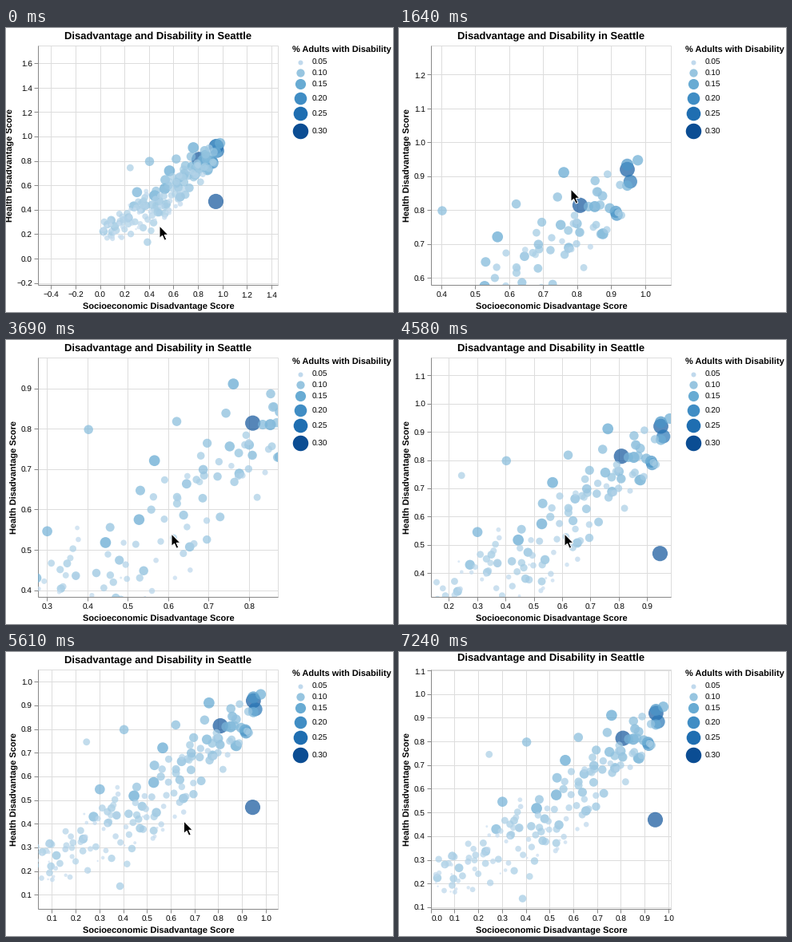
A matplotlib script that plays this animation: 484x356 px, repeating every 7.54 s.

```python
import math

import numpy as np
import matplotlib.pyplot as plt
from matplotlib.animation import FuncAnimation
from matplotlib.collections import LineCollection
from matplotlib.colors import LinearSegmentedColormap
from matplotlib.patches import Polygon, Rectangle

W, H, DPI = 484, 356, 72          # at 72 dpi one point is one pixel
LOOP, INTERVAL = 7540, 29
FRAMES = LOOP // INTERVAL
BEATS = 51                        # the picture only changes on a beat
LEFT, TOP, SIZE = 40, 22, 300
RIGHT, BOTTOM = LEFT + SIZE, TOP + SIZE
FLUSH = 1.5                       # x labels this close to an end align inwards

plt.rcParams["font.family"] = "Liberation Sans"
plt.rcParams["text.hinting"] = "none"
BLUES = LinearSegmentedColormap.from_list("blues", [
    "#cfe1f2", "#bed8ec", "#a8cee5", "#8fc1de", "#74b2d7", "#5ba3cf",
    "#4592c6", "#3181bd", "#206fb2", "#125ca4", "#0a4a90"])

# the few points that stand out: x, y, share of adults with a disability
LANDMARKS = [
    (.808, .815, .29), (.944, .471, .29), (.947, .921, .28),
    (.956, .885, .24), (.947, .935, .19), (.913, .796, .19),
    (.916, .787, .19), (.978, .948, .15), (.760, .912, .16),
    (.565, .722, .16), (.444, .519, .16), (.300, .547, .14),
    (.620, .819, .12), (.402, .799, .12), (.244, .747, .08),
    (.385, .138, .09),
]

# view at the start, then gestures: kind, first beat, last beat, goal
# (cursor position, or pixels per unit for a zoom around the cursor)
START = 153, (118, 289.5), (192, 248)
GESTURES = [
    ("drag", 0, 6, (169.5, 292.5)),
    ("move", 7, 8, (215, 202)),
    ("zoom", 8, 12, 597),
    ("zoom", 12, 13, 506),
    ("move", 13, 14, (313, 231.5)),
    ("drag", 14, 17, (201, 213)),
    ("drag", 17, 23, (393, 109.5)),
    ("move", 23, 25, (207, 243)),
    ("zoom", 28, 32.5, 296.8),
    ("move", 34, 36, (221, 281)),
    ("drag", 36, 38, (222.5, 212)),
    ("drag", 38, 44, (234.5, 227.6)),
    ("move", 46, 49, (430, 390)),
]


def radius(share):
    return np.sqrt(np.maximum(9 + 345 * (np.asarray(share) - 0.05), 1.5))


def shade(share):
    return BLUES((np.asarray(share) - 0.025) / 0.28)


def make_data(count=165):
    """A curved, correlated cloud; the share rises with the health score."""
    rng = np.random.default_rng(7)
    x = np.linspace(.02, .93, count) + rng.normal(0, .02, count)
    spread = .05 + .08 * np.sin(np.pi * x) ** 2
    y = .22 + .34 * x + .36 * x ** 2 + spread * rng.triangular(-2, 0, 2, count)
    share = np.clip(.03 + .11 * y + rng.normal(0, .025, count), .025, .165)
    order = np.argsort(-share)
    cloud = np.array([x, y, share])[:, order]
    return np.hstack([np.array(LANDMARKS).T, cloud])


def state(beat):
    scale, origin, tip = START
    origin, tip = np.array(origin, float), np.array(tip, float)
    for kind, begin, end, goal in GESTURES:
        u = min(max((beat - begin) / (end - begin), 0), 1)
        if kind == "zoom":
            factor = (goal / scale) ** u
            origin = tip + (origin - tip) * factor
            scale *= factor
        else:
            shift = (np.array(goal) - tip) * u
            tip = tip + shift
            if kind == "drag":
                origin = origin + shift
        if u < 1:
            break
    return scale, origin, tip


def tick_step(span, count=8):
    raw = span / count
    power = 10.0 ** math.floor(math.log10(raw))
    err = raw / power
    factor = (10 if err >= 50 ** .5 else 5 if err >= 10 ** .5
              else 2 if err >= 2 ** .5 else 1)
    return factor * power


def ticks(lo, hi, step):
    return [i * step for i in range(math.ceil(lo / step),
                                    math.floor(hi / step) + 1)]


fig = plt.figure(figsize=(W / DPI, H / DPI), dpi=DPI, facecolor="white")
ax = fig.add_axes([0, 0, 1, 1])
ax.set(xlim=(0, W), ylim=(H, 0))
ax.axis("off")


def label(x, y, s, size=10, **kw):
    return ax.text(x, y, s, fontsize=size, color="black", **kw)


def heading(x, y, s, size=11, **kw):
    return label(x, y, s, size, weight="bold", **kw)


ax.add_patch(Rectangle((LEFT, TOP), SIZE, SIZE, fill=False, ec="#dddddd", lw=1))
grid = ax.add_collection(LineCollection([], colors="#dddddd", linewidths=1))
marks = ax.add_collection(LineCollection([], colors="#888888", linewidths=1))

px, py, share = make_data()
dots = ax.scatter(px, py, s=(2 * radius(share)) ** 2, c=shade(share),
                  alpha=0.7, linewidths=0, zorder=3)
dots.set_clip_path(Rectangle((LEFT, TOP), SIZE, SIZE, transform=ax.transData))

x_labels = [label(0, 338, "", ha="center") for _ in range(14)]
y_labels = [label(33, 0, "", ha="right") for _ in range(14)]
title = heading(190, 14, "Disadvantage and Disability in Seattle", 13,
                ha="center")
heading(191, 353, "Socioeconomic Disadvantage Score", ha="center")
y_title = heading(14, 172, "Health Disadvantage Score", ha="center",
                  va="baseline", rotation=90, rotation_mode="anchor")

heading(358, 31, "% Adults with Disability")
row_top = 36
for v in np.arange(1, 7) * 0.05:
    r = radius(v)
    row = max(2 * r, 10) + 3
    cy = row_top + row / 2
    ax.scatter(368, cy, s=(2 * r) ** 2, color=[shade(v)], linewidths=0)
    label(383, round(cy) + 4, f"{v:.2f}")
    row_top += row

ARROW = np.array([(0, 0), (0, 15.5), (3.5, 12.3), (6.2, 18.2), (8.8, 17.1),
                  (6.2, 11.3), (11, 11.3)])
cursor = ax.add_patch(Polygon(ARROW, fc="black", ec="white", lw=1, zorder=9))


def fill(pool, texts):
    for item, text in zip(pool, texts + [""] * (len(pool) - len(texts))):
        item.set_text(text)


def draw(frame):
    beat = min(int((frame * INTERVAL + 34) * BEATS / LOOP), BEATS - 1)
    scale, (ox, oy), tip = state(beat)
    dots.set_offsets(np.column_stack([ox + scale * px, oy - scale * py]))
    cursor.set_xy(ARROW + tip)

    step = tick_step(SIZE / scale)
    digits = max(1, -math.floor(math.log10(step) + 1e-9))
    xt = ticks((LEFT - ox) / scale, (RIGHT - ox) / scale, step)
    yt = ticks((oy - BOTTOM) / scale, (oy - TOP) / scale, step)
    xs = [ox + scale * v for v in xt]
    ys = [oy - scale * v for v in yt]

    def text(v):
        return f"{v:.{digits}f}".replace("-", "\u2212")

    fill(x_labels, [text(v) for v in xt])
    fill(y_labels, [text(v) for v in yt])
    for item, x in zip(x_labels, xs):
        item.set_x(x)
        item.set_ha("left" if x - LEFT < FLUSH
                    else "right" if RIGHT - x < FLUSH else "center")
    for item, y in zip(y_labels, ys):
        item.set_y(round(y) + 4)

    # whole numbers snap to crisp one-pixel lines
    gx, gy = [math.floor(x) for x in xs], [math.floor(y) for y in ys]
    grid.set_segments([[(x, TOP), (x, BOTTOM)] for x in gx]
                      + [[(LEFT, y), (RIGHT, y)] for y in gy])
    marks.set_segments([[(x, BOTTOM), (x, BOTTOM + 5)] for x in gx]
                       + [[(LEFT - 5, y), (LEFT, y)] for y in gy]
                       + [[(LEFT, TOP), (LEFT, BOTTOM)],
                          [(LEFT, BOTTOM), (RIGHT, BOTTOM)]])

    # wide or high labels push the titles outwards
    title.set_y(14 - max(0, 26 - min(ys)))
    y_title.set_x(14 - 5.8 * (yt[0] < -1e-9) - 5.6 * (digits - 1))
    return []


anim = FuncAnimation(fig, draw, frames=FRAMES, interval=INTERVAL,
                     init_func=lambda: draw(0), repeat=True, repeat_delay=0)
plt.show()
```
